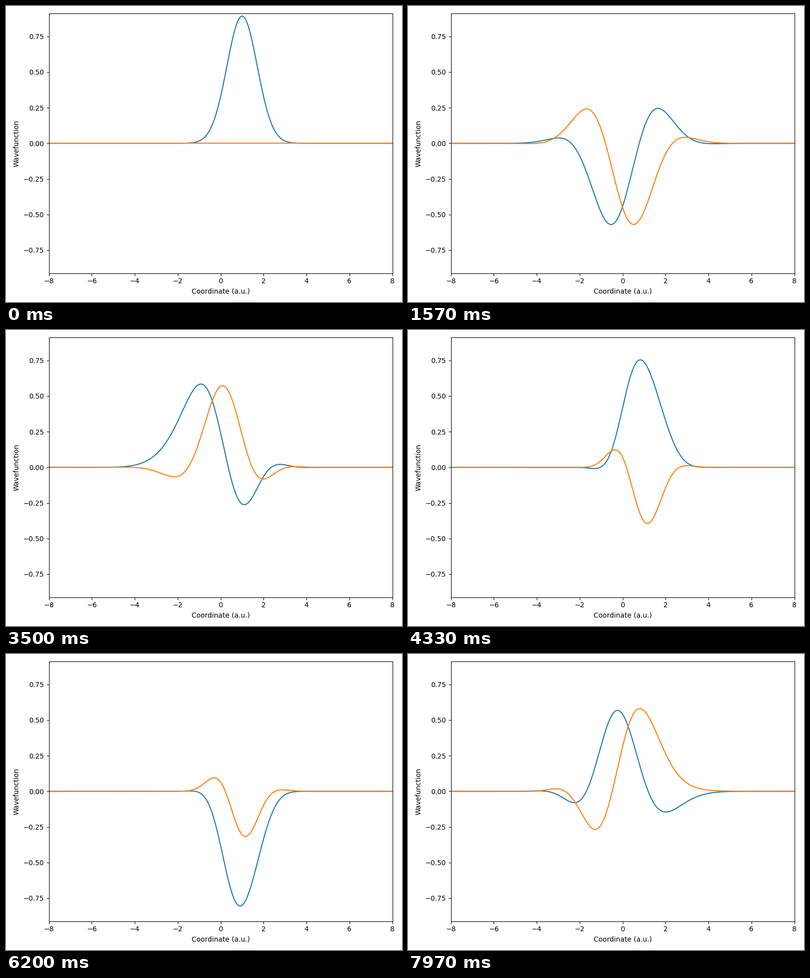
Animation, 800 px wide and 600 px high, one loop 8 s. Source, as a matplotlib script:

```python
import numpy as np
import matplotlib.pyplot as plt
from matplotlib.animation import FuncAnimation

FRAMES = 240
LOOP_MS = 8000
DT = 0.1      # time step per frame (a.u.)
WIDTH = 2.0   # initial exponent: exp(-WIDTH / 2 * (x - X0)^2)
X0 = 1.0

x = np.linspace(-8, 8, 801)


def wavefunction(t):
    """Displaced, squeezed Gaussian in a harmonic well (m = omega = hbar = 1)."""
    c, s = np.cos(t), np.sin(t)
    z = c + 1j * WIDTH * s
    a = (WIDTH * c + 1j * s) / z
    theta = t + np.angle(z * np.exp(-1j * t))  # continuous phase of z
    norm = (WIDTH / np.pi) ** 0.25 / np.sqrt(abs(z)) * np.exp(-0.5j * theta)
    xc, p = X0 * c, -X0 * s
    return norm * np.exp(-a / 2 * (x - xc) ** 2 + 1j * p * (x - xc / 2))


fig, ax = plt.subplots(figsize=(8, 6), dpi=100)
psi0 = wavefunction(0.0)
real_line, = ax.plot(x, psi0.real)
imag_line, = ax.plot(x, psi0.imag)
ax.set_xlim(-8, 8)
ax.set_ylim(-0.912, 0.912)
ax.set_xlabel("Coordinate (a.u.)")
ax.set_ylabel("Wavefunction")
fig.tight_layout()


def update(frame):
    psi = wavefunction(frame * DT)
    real_line.set_ydata(psi.real)
    imag_line.set_ydata(psi.imag)
    return real_line, imag_line


anim = FuncAnimation(fig, update, frames=FRAMES, interval=LOOP_MS / FRAMES,
                     init_func=lambda: update(0), repeat=True, repeat_delay=0)
plt.show()
```
